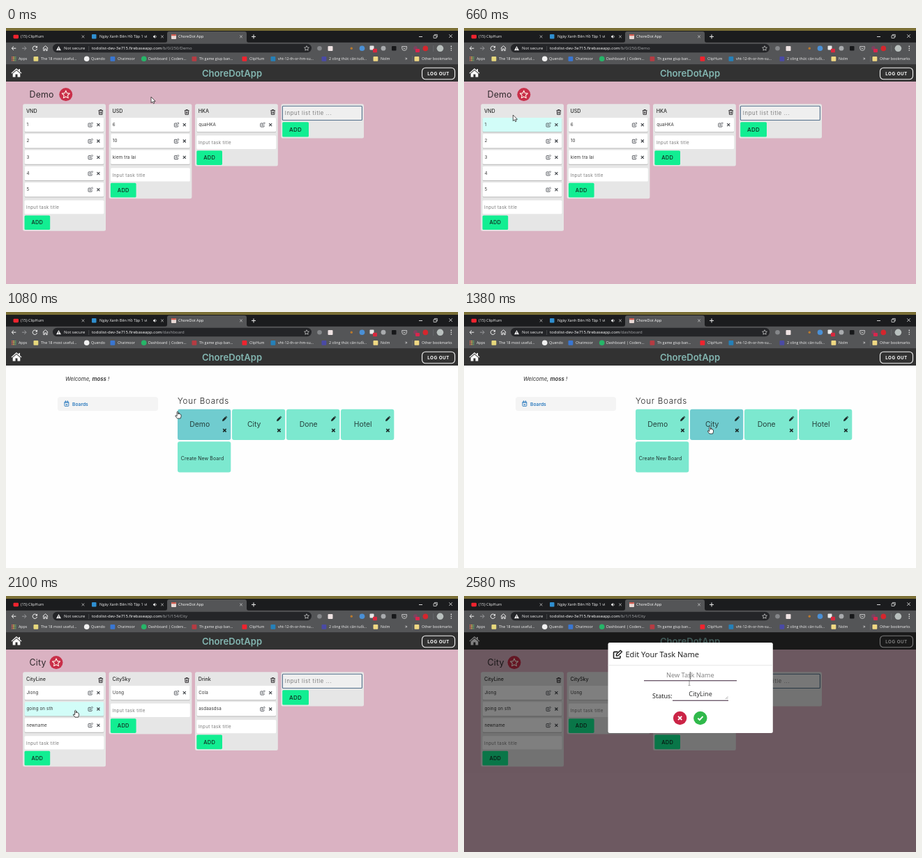
Write an HTML page that moves like this. It is 648 px wide and 368 px high and loops after 2.64 s.

```html
<!DOCTYPE html>
<html lang="en">
<head>
<meta charset="utf-8">
<title>Task boards</title>
<style>
html, body { margin: 0; width: 100%; height: 100%; overflow: hidden; background: #202124; }
svg { display: block; width: 648px; height: 368px; }
text { white-space: pre; }
.ui { font-family: "Open Sans", "Noto Sans", sans-serif; font-weight: 500; }
.app { font-family: Inter, Roboto, sans-serif; }
.dlg { font-family: "Noto Sans", "Open Sans", sans-serif; }
</style>
</head>
<body>
<svg id="stage" viewBox="0 0 648 368" xmlns="http://www.w3.org/2000/svg">
  <defs>
    <g id="edit" fill="none" stroke="currentColor" stroke-linejoin="round">
      <path d="M.2-2.2H-2.6Q-3.2-2.2-3.2-1.6V2.3Q-3.2 2.9-2.6 2.9H1.4Q2 2.9 2 2.3V.9" stroke-width=".9"/>
      <path d="M-1.1 1L-.9-.4L2.2-3.4L3.4-2.2L.3.8Z" stroke-width=".8"/>
    </g>
    <path id="cross" d="M-2-2L2 2M2-2L-2 2" fill="none" stroke="currentColor"/>
    <g id="bin" fill="none" stroke="#2d2a2d" stroke-width=".9">
      <path d="M-3.3-2.4H3.3M-1.2-2.6V-3.5H1.2V-2.6M-2.5-2.2L-2.2 3.4H2.2L2.5-2.2M-.8-.8V2.2M.8-.8V2.2"/>
    </g>
    <path id="pencil" d="M-3.4 3.4L-2.9 1L1-2.9L2.9-1L-1 2.9ZM1.5-3.3L2.2-3.9L3.9-2.2L3.3-1.5Z" fill="#1d2c2a"/>
    <path id="house" d="M-7.5.3L0-6.4L3.3-3.5V-5.3H5V-2L7.5.3L6.7 1.2L0-4.7L-6.7 1.2ZM-5.3 1.2L0-3.5L5.3 1.2V6H1.5V2.2H-1.5V6H-5.3Z"/>
    <path id="arrow" d="M0 0V8.6L2 6.8L3.4 9.7L4.8 9L3.5 6.3H6.2Z" fill="#fff" stroke="#111" stroke-width=".7"/>
    <path id="hand" d="M-.9.7Q0-.6.9.7V4Q2-.1 2.4 3.4 3.6 3 3.9 4.2 5 4.1 5 5.2V7.3L4.1 10H-.5L-3 6.9Q-3.3 5.3-1.9 5.8L-.9 6.8Z" fill="#fff" stroke="#111" stroke-width=".75"/>
    <path id="beam" d="M-1.5-3.6H-.5L0-3.1L.5-3.6H1.5M0-3.1V3.1M-1.5 3.6H-.5L0 3.1L.5 3.6H1.5" fill="none" stroke="#555" stroke-width=".6"/>
  </defs>
</svg>
<script>
const LOOP = 2640, STEP = 60;
const DASH_AT = 780, CARDS_AT = 1020, CITY_AT = 1680, MODAL_AT = 2280, FADE = 120;
const INK = '#2b2b2b', MINT = '#7ce8cf', PINK = '#dab2c2', BAR = '#545557';
const stage = document.getElementById('stage');

const rect = (x, y, w, h, fill, r = 0, extra = '') =>
  `<rect x="${x}" y="${y}" width="${w}" height="${h}" rx="${r}" fill="${fill}" ${extra}/>`;
const disc = (x, y, r, fill, extra = '') => `<circle cx="${x}" cy="${y}" r="${r}" fill="${fill}" ${extra}/>`;
const text = (x, y, size, str, fill, extra = '') =>
  `<text x="${x}" y="${y}" font-size="${size}" fill="${fill}" ${extra}>${str}</text>`;
const line = (d, color, w = 1, extra = '') =>
  `<path d="${d}" fill="none" stroke="${color}" stroke-width="${w}" ${extra}/>`;
const icon = (id, x, y, color = '#444', k = 1, w = 1) =>
  `<use href="#${id}" transform="translate(${x} ${y}) scale(${k})" color="${color}" fill="${color}" stroke-width="${w}"/>`;
const mid = 'text-anchor="middle" ';

function starPath(cx, cy, r) {
  let d = '';
  for (let i = 0; i < 10; i++) {
    const a = -Math.PI / 2 + i * Math.PI / 5, q = i % 2 ? r * 0.48 : r;
    d += (i ? 'L' : 'M') + (cx + q * Math.cos(a)).toFixed(2) + ' ' + (cy + q * Math.sin(a)).toFixed(2);
  }
  return d + 'Z';
}

function browser() {
  const pale = '#f0f0f0';
  let s = rect(0, 0, 648, 52.3, '#1b1c1e') + rect(0, 0, 648, 4, '#7b7036');
  s += `<path d="M228 21Q231 21 231 18V8Q231 5 234 5H342Q345 5 345 8V18Q345 21 348 21Z" fill="${BAR}"/>`;
  s += rect(0, 20.8, 648, 31.5, BAR) + rect(67, 22.8, 371, 12.5, '#242528', 6.2);
  // tabs and window buttons
  s += rect(10.5, 9.7, 7.5, 5.5, '#f0232e', 1.4) + rect(123, 9, 6.5, 6.5, '#2f8fd0', 1);
  s += rect(237, 9, 7, 7, '#e8d9d5', 1) + rect(237, 9, 7, 2.2, '#d05a4e', 1);
  s += text(21, 14.2, 5.5, '(15) ClipHum', pale) + text(247, 14.2, 5.5, 'ChoreDot App', '#fff');
  s += text(134, 14.2, 5.5, 'Ngày Xanh Bên Hồ Tập 1 vi', pale);
  s += `<path d="M211 11.3H212.5L214 9.8V15L212.5 13.5H211Z" fill="#ddd"/>` + line('M215 11Q216 12.4 215 13.8', '#ddd', .7);
  for (const x of [110.5, 224, 337]) s += icon('cross', x, 12.4, '#ccc', .9, .9);
  s += line('M352 12.4H358M355 9.4V15.4', '#eee') + line('M592 12.5H597', '#eee', .9);
  s += line('M613 10.8H617V14.5H613ZM614.3 10.7V9.4H618.3V13H617', '#eee', .7) + icon('cross', 637.5, 11.6, '#eee', 1.1, .8);
  // toolbar
  s += line('M14.3 29.2H8.3M11 26.4L8.2 29.2L11 32', '#f4f4f4', 1) + line('M23 29.2H29M26.3 26.4L29.1 29.2L26.3 32', '#97989b', 1);
  s += line('M44 27.4A3.2 3.2 0 1 0 44.5 30', '#f4f4f4', 1) + `<path d="M45 25.6V28.6H42Z" fill="#f4f4f4"/>`;
  s += line('M52.8 29L56.5 25.7L60.2 29M53.8 28.4V32.6H55.4V30H57.6V32.6H59.2V28.4', '#f4f4f4', .9);
  s += `<path d="M75.5 26L79 32.3H72Z" fill="#eee"/>` + line('M75.5 28.2V30.2M75.5 30.9V31.6', '#202124', .7);
  s += text(83, 31.2, 6, 'Not secure', '#f0f0f0') + line('M118.7 26V33', '#66686c', .5);
  s += `<text x="123" y="31.2" font-size="6" fill="#fff">todolist-dev-3e715.firebaseapp.com<tspan id="path" fill="#a5a7aa"></tspan></text>`;
  s += line(starPath(431, 29.3, 3.6), '#ddd', .7);
  // toolbar add-ons as plain marks
  s += disc(449.5, 29.2, 3.3, '#85878a') + rect(461.5, 26, 7, 7, '#eee2e2', 1) + disc(495.3, 29.3, 1.7, '#b8792e');
  s += disc(510.5, 29.2, 3.8, '#4a90d6') + rect(521.5, 25.5, 6, 6, '#e8e8e8', 1) + rect(526, 29.8, 6, 5.4, '#d8283e', 1);
  s += disc(541, 29.2, 3.4, '#a9abae') + rect(553, 26, 6.5, 6.5, '#17181a', 1);
  s += line('M567.7 26.5H574.5V29A3.4 3.4 0 0 1 567.7 29ZM569.4 28.4L571.1 30L572.8 28.4', '#ddd', .8);
  s += disc(587, 29, 2.9, '#7c4260') + rect(587, 30, 6, 5, '#d9264d', 1) + disc(601.3, 29.4, 3.8, '#d5262d');
  s += line('M612.7 25V34', '#77797c', .5) + disc(622.4, 29.3, 4.8, '#b9c0be');
  for (const y of [26.4, 29.2, 32]) s += disc(638.3, y, .8, '#f4f4f4');
  // bookmarks
  for (let i = 0; i < 9; i++) s += rect(8 + i % 3 * 2.4, 41 + (i / 3 | 0) * 2.4, 1.6, 1.6, ['#d96054', '#d9b84f', '#65a76b'][i % 3]);
  const marks = [
    [18, 'Apps'], [50, 'The 18 most useful...', '#e6d77c', 1], [122, 'Quendo', '#f1f1f1'], [160, 'Chatmoor', '#3976d2', 1],
    [204, 'Dashboard | Coders...', '#26b568'], [277, 'Th game giup ban...', '#b53b42', 1], [349, 'ClipHum', '#f0232e', 1],
    [390, 'vht-12-th-or-hm-su...', '#2580b8', 1], [463, '2 công thức căn tuổi...', '#4a4aa5', 1],
    [537, 'Nolm', '#f0d883', 1], [596, 'Other bookmarks', '#f0d883', 1]
  ];
  for (const [x, label, color, square] of marks) {
    s += text(x, 46, 5.3, label, pale);
    if (color) s += square ? rect(x - 10.5, 41, 6.8, 6.8, color, 1) : disc(x - 6.3, 44.3, 3.8, color);
  }
  return s + text(572, 46, 7, '»', pale) + line('M582.5 40V49', '#77797c', .5);
}

function navbar() {
  return rect(0, 52, 648, 25, '#323232') + icon('house', 15, 64.4, '#fff') +
    text(324, 69.8, 13.1, 'ChoreDotApp', '#83b6b1', mid + 'font-weight="600"') +
    rect(596.5, 57.2, 47, 16.6, 'none', 5, 'stroke="#f4f4f4" stroke-width="1.1"') +
    text(620, 67.6, 6.3, 'LOG OUT', '#fff', mid + 'font-weight="700" letter-spacing=".5"');
}

const hot = [];
function target(scene, x, y, w, h, base, lit, r, slack = 0) {
  hot.push({ scene, x, y, w, h, base, lit, slack });
  return rect(x, y, w, h, base, r, `id="hot${hot.length - 1}"`);
}

function column(scene, i, [title, ...tasks]) {
  const x = 24.2 + i * 123.4, inputY = 131.3 + tasks.length * 23.3;
  let s = rect(x, 109.2, 118.8, inputY + 44 - 109.2, '#e6e6e6', 2.5);
  s += text(x + 4.8, 122, 7.1, title, INK, 'font-weight="500"') + icon('bin', x + 111.6, 121);
  tasks.forEach((task, k) => {
    const y = 129 + k * 23.3;
    s += rect(x + 2.6, y + .8, 113.4, 20.4, '#b9b9b9', 1.5);
    s += target(scene, x + 2.6, y, 113.4, 20.2, '#fff', '#d2fdf8', 1.5, k ? 0 : 5);
    s += text(x + 5.2, y + 12.1, 6.2, task, '#333', 'letter-spacing=".15"') + icon('edit', x + 97, y + 10.2, '#4b4f55');
    s += icon('cross', x + 108.2, y + 10.2, '#3e4247', 1, 1.1);
  });
  s += rect(x + 2.4, inputY, 113.8, 19.4, '#fff', 1.5);
  s += text(x + 4.9, inputY + 12.3, 6.2, 'Input task title', '#777', 'letter-spacing=".38"');
  return s + addButton(x + 2.3, inputY + 21.6, 36.7, 20.7, 7.4);
}

function addButton(x, y, w, h, size) {
  return rect(x, y, w, h, '#12ee92', 1.6) +
    text(x + w / 2, y + h / 2 + size * .36, size, 'ADD', '#10281e', mid + 'font-weight="500" letter-spacing=".3"');
}

function board(scene, title, x, badgeX, lists) {
  let s = rect(0, 77, 648, 291, PINK) + text(x, 100.2, 12.4, title, '#302a2d', 'letter-spacing=".2"');
  s += disc(badgeX, 95.6, 9.5, '#c92f49') + line(starPath(badgeX, 95.9, 5.8), '#fff1e6', 1.1, 'stroke-linejoin="round"');
  lists.forEach((list, i) => { s += column(scene, i, list); });
  s += rect(394.4, 109.2, 118.6, 49.4, '#e6e6e6', 2.5);
  s += rect(396.4, 112.3, 114, 20.2, '#efefef', 1, 'stroke="#53708c" stroke-width="1.1"');
  s += text(399.8, 125, 7.7, 'Input list title ...', '#7b7b7b', 'letter-spacing=".62"');
  return `<g id="${scene}">${s}${addButton(396.2, 135.2, 37.8, 21.3, 8)}</g>`;
}

function dashboard() {
  let s = rect(0, 77, 648, 291, '#fefefe');
  s += `<text x="85" y="99.4" font-size="7.8" fill="${INK}" font-style="italic">Welcome, <tspan font-weight="600">moss</tspan> !</text>`;
  s += rect(74, 122, 144, 20.2, '#f4f4f4', 4) + rect(83.9, 129, 5.9, 6.4, 'none', .8, 'stroke="#2878bd" stroke-width=".9"');
  s += line('M83.9 130.2H89.8M85.4 127.4V129.4M88.3 127.4V129.4', '#2878bd', 1) + line('M85.6 133.2H88.1', '#2878bd', 1.4);
  s += text(95, 134.6, 6.7, 'Boards', '#2878bd', 'font-weight="600"');
  s += text(246, 132, 11.6, 'Your Boards', '#222', 'font-weight="300" letter-spacing=".75"');
  let cards = '';
  ['Demo', 'City', 'Done', 'Hotel'].forEach((name, i) => {
    const x = 246 + i * 78;
    cards += target('dash', x, 139.8, 76.3, 44.3, MINT, '#70cccf', 3) + text(x + 31.7, 165.2, 10.4, name, '#25403c', mid);
    cards += icon('pencil', x + 67.4, 153.5) + icon('cross', x + 67.4, 170.2, '#1d2c2a', 1.1, 1.5);
  });
  s += `<g id="cards">${cards}</g><g id="create">` + rect(246, 139.8, 76.3, 44.3, MINT, 3) +
    text(281.5, 166.3, 6.9, 'Create New Board', '#1d2f2c', mid + 'letter-spacing=".12"') + '</g>';
  return `<g id="dash">${s}</g>`;
}

function dialog() {
  let s = rect(206.5, 67, 236.3, 130, '#fff', 2.5) + icon('edit', 220.3, 84.3, '#1d1d1d', 1.8);
  s += text(231.5, 88, 11, 'Edit Your Task Name', '#222', 'font-weight="500"') + line('M206.5 99.5H442.8', '#e3e3e3', .8);
  s += text(324.3, 117.4, 9.2, 'New Task Name', '#858585', mid) + line('M258 121.8H391', '#3b2138', 1.1);
  s += line('M324.3 109V120', '#222', .8);
  s += text(270, 146.6, 9, 'Status:', '#222', 'font-weight="500"') + text(339, 144.2, 9, 'CityLine', '#333', mid);
  s += line('M299 150.2H379', '#3b2138', 1.1) + line('M374.8 148L378.3 144.5M376.8 148L378.3 146.5', '#777', .6);
  s += disc(309.6, 175.5, 9.7, '#cb2446') + icon('cross', 309.6, 175.5, '#fff', 1.3, 1.5);
  s += disc(338.8, 175.5, 9.7, '#30b94b') + line('M335.3 175.8L337.8 178.2L342.5 173.2', '#fff', 1.9);
  return `<g id="modal">${rect(0, 52.2, 648, 315.8, '#000', 0, 'fill-opacity=".5"')}<g id="panel" class="dlg">${s}</g></g>`;
}

stage.insertAdjacentHTML('beforeend',
  '<g class="app">' +
  board('demo', 'Demo', 33.5, 85.8, [['VND', '1', '2', '3', '4', '5'], ['USD', '6', '10', 'kiem tra lai'], ['HKA', 'quaHKA']]) +
  board('city', 'City', 33.5, 72, [['CityLine', 'Jiong', 'going on sth', 'newname'], ['CitySky', 'Uong'], ['Drink', 'Cola', 'asdaasdsa']]) +
  dashboard() + navbar() + '</g>' + `<g class="ui">${browser()}</g>` + dialog() + '<use id="pointer" href="#arrow"/>');

const el = id => document.getElementById(id);
const nodes = hot.map((h, i) => el('hot' + i));
const show = (id, on) => el(id).setAttribute('visibility', on ? 'visible' : 'hidden');
const ease = u => u * u * (3 - 2 * u);

// pointer stops: time, x, y
const route = [
  [0, 208, 99], [180, 198, 102], [480, 84, 139], [600, 77, 134], [660, 70.3, 125], [750, 16, 66], [780, 22, 68],
  [840, 123, 102.3], [1080, 246, 143], [1320, 351, 164], [1380, 352.5, 165], [1620, 350, 166], [1680, 338.6, 167],
  [2100, 99.5, 164.2], [2220, 120.5, 162.5], [2340, 121, 162.5], [2520, 323, 125], [LOOP, 323, 125]
];
function pointerAt(t) {
  const i = Math.max(1, route.findIndex(p => p[0] > t)), a = route[i - 1], b = route[i];
  const u = ease((t - a[0]) / (b[0] - a[0]));
  return [a[1] + (b[1] - a[1]) * u, a[2] + (b[2] - a[2]) * u];
}

function draw(time) {
  const t = Math.floor(time % LOOP / STEP) * STEP;
  const scene = t < DASH_AT ? 'demo' : t < CITY_AT ? 'dash' : 'city';
  const loaded = scene === 'dash' && t >= CARDS_AT, open = t >= MODAL_AT;
  const [x, y] = pointerAt(t);
  for (const id of ['demo', 'dash', 'city']) el(id).style.display = id === scene ? '' : 'none';
  show('cards', loaded);
  el('create').setAttribute('transform', `translate(0 ${loaded ? 46.5 : 0})`);
  el('path').textContent = { demo: '/b/0/250/Demo', dash: '/dashboard', city: '/b/1/154/City' }[scene];

  let shape = x < 26 && y > 54 && y < 75 ? 'hand' : 'arrow';
  hot.forEach((h, i) => {
    const live = h.scene === scene && !open && (scene !== 'dash' || loaded);
    const inX = x >= h.x && x <= h.x + h.w, above = y <= h.y + h.h;
    const over = live && inX && above && y >= h.y - h.slack;
    if (over && y >= h.y) shape = 'hand';
    nodes[i].setAttribute('fill', over ? h.lit : h.base);
  });
  const onWelcome = scene === 'dash' && x > 84 && x < 150 && y > 91 && y < 104;
  const onField = open && x > 258 && x < 391 && y > 106 && y < 127;
  if (onWelcome || onField) shape = 'beam';

  const k = open ? Math.min(1, (t - MODAL_AT + STEP) / FADE) : 0;
  show('modal', open);
  el('modal').setAttribute('opacity', k);
  el('panel').setAttribute('transform', `translate(0 ${-12 * (1 - k)})`);
  el('pointer').setAttribute('href', '#' + shape);
  el('pointer').setAttribute('transform', `translate(${x.toFixed(2)} ${y.toFixed(2)})`);
}

const start = performance.now();
function tick() {
  draw(performance.now() - start);
  requestAnimationFrame(tick);
}
tick();
</script>
</body>
</html>
```
